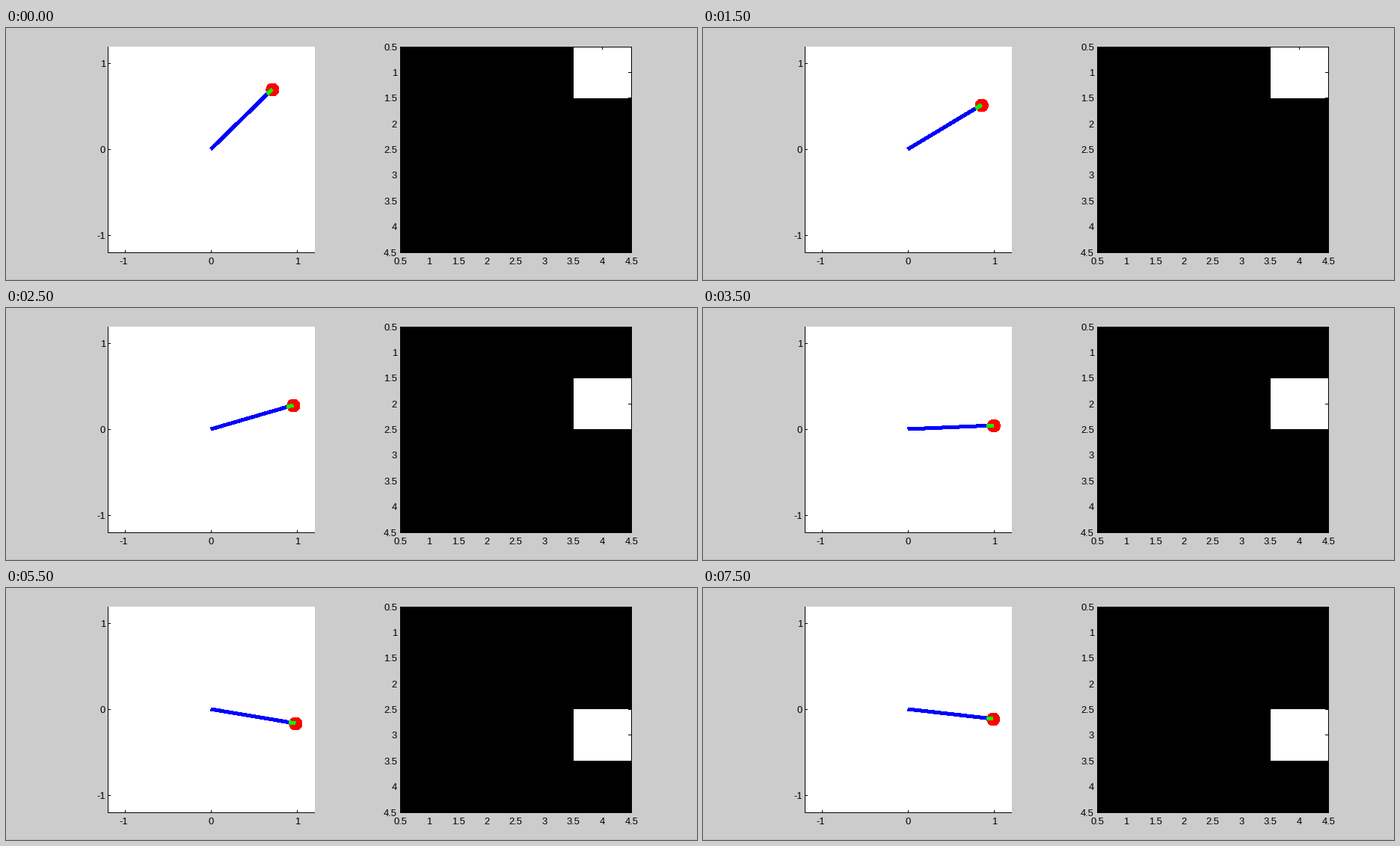
A matplotlib script that plays this animation: 924x337 px, repeating every 8000 ms.

```python
import numpy as np
import matplotlib.pyplot as plt
from matplotlib.animation import FuncAnimation
from matplotlib.patches import Circle, Rectangle

W, H, DPI = 924, 337, 100
PX = 72 / DPI  # points per pixel
STEP_MS = 500

PIVOT = np.array([274.5, 162.5])
ARM = 114.5
BOB = 8.5
# Height of the bob above the pivot, in pixels, at each time step
HEIGHTS = [80, 76, 69, 59, 46, 32, 18, 5, -6, -13, -18, -19, -19, -17, -14, -13]

plt.rcParams["font.family"] = "Liberation Sans"
fig = plt.figure(figsize=(W / DPI, H / DPI), dpi=DPI, facecolor="#cccccc")
ax = fig.add_axes([0, 0, 1, 1])
ax.set_xlim(0, W)
ax.set_ylim(H, 0)
ax.axis("off")


def box(x0, y0, x1, y1, color, z=1):
    """Fill whole pixels from (x0, y0) up to, not including, (x1, y1)."""
    rect = Rectangle((x0, y0), x1 - x0, y1 - y0, facecolor=color,
                     linewidth=0, antialiased=False, zorder=z)
    return ax.add_patch(rect)


def label(x, y, text, ha):
    ax.text(x, y, text, ha=ha, va="baseline", fontsize=13 * PX, color="black")


def stroke(color, z):
    return ax.plot([], [], color=color, linewidth=4 * PX, zorder=z,
                   solid_capstyle="butt", antialiased=False)[0]


def draw_arm_plot():
    box(136, 25, 413, 301, "white")
    box(136, 25, 137, 301, "black", 2)
    box(136, 300, 413, 301, "black", 2)
    for v in (-1, 0, 1):
        x, y = 274 + 115 * v, 162 - 115 * v
        box(x, 297, x + 1, 301, "black", 2)
        box(136, y, 140, y + 1, "black", 2)
        label(x + (0.5 if v >= 0 else -1.5), 316, str(v), "center")
        label(133, y + 5, str(v), "right")


def draw_grid_plot():
    box(527, 25, 837, 301, "black")
    box(836, 25, 837, 301, "black", 4)
    box(527, 25, 837, 26, "black", 4)
    for k in range(9):
        x, y = int(527 + 309 * k / 8), int(25 + 275 * k / 8)
        box(x, 25, x + 1, 29, "black", 4)
        box(832, y, 837, y + 1, "black", 4)
        text = f"{0.5 + k / 2:g}"
        label(x + 0.5, 316, text, "center")
        label(523, y + 5, text, "right")


box(0, 336, W, H, "#bcbcbc")
draw_arm_plot()
draw_grid_plot()

cell = box(759, 25, 836, 94, "white", 3)
arm = stroke("#0000ff", 5)
bob = ax.add_patch(Circle(PIVOT, BOB, facecolor="#ff0000", linewidth=0,
                          antialiased=False, zorder=6))
overlap = stroke("#00ff00", 7)

ROW_EDGES = [25, 94, 162, 231, 300]


def cell_row(height):
    """Angle bin of the arm: one grid row per sector."""
    angle = np.degrees(np.arcsin(height / ARM))
    return 0 if angle > 27 else 1 if angle > 0 else 2


def update(i):
    h = HEIGHTS[i]
    reach = np.array([np.sqrt(ARM**2 - h**2), -h])
    tip = PIVOT + reach
    bob.center = tuple(tip)

    start = PIVOT - 0.5
    end = start + reach
    edge = end - reach / ARM * BOB
    arm.set_data(*zip(start, end))
    overlap.set_data(*zip(edge, end))

    row = cell_row(h)
    top, bottom = ROW_EDGES[row], ROW_EDGES[row + 1]
    cell.set_y(top)
    cell.set_height(bottom - top)
    return cell, arm, bob, overlap


anim = FuncAnimation(fig, update, frames=len(HEIGHTS), interval=STEP_MS,
                     repeat=True, repeat_delay=0, blit=False)
plt.show()
```
